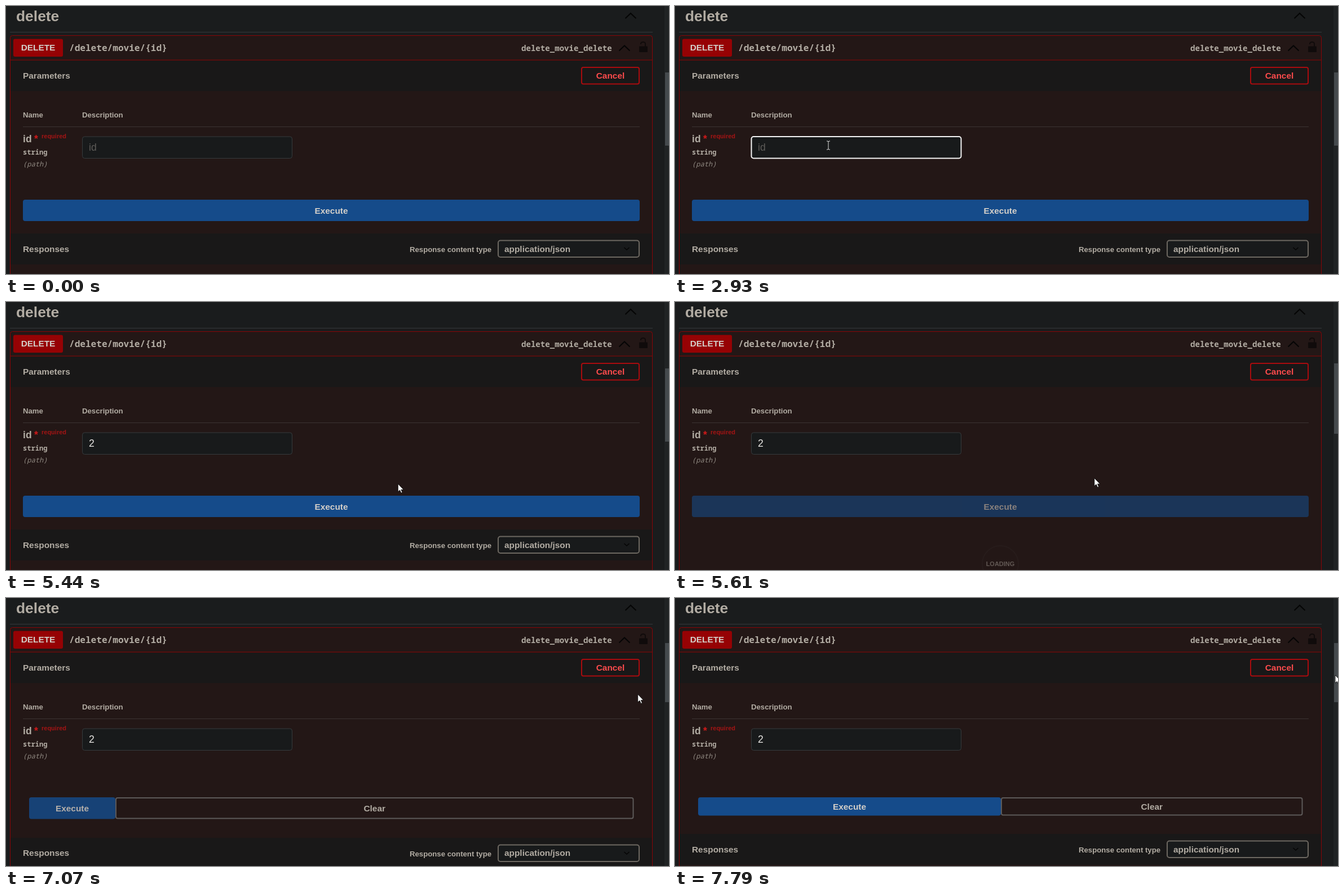
Animation of 1176 by 476 pixels, one loop 8 s. Source, as an HTML page:

```html
<!DOCTYPE html>
<html lang="en">
<head>
<meta charset="utf-8">
<style>
  html, body { margin: 0; width: 100%; height: 100%; overflow: hidden; background: #1a1c1d; }
  svg { display: block; width: 1176px; height: 476px; }
  text { font: bold 15.4px "Liberation Sans", Arial, sans-serif; fill: #b2aca3; }
  .small { font-size: 13.2px; }
  .mono { font-family: "Noto Sans Mono", monospace; font-weight: 600; }
  .middle { text-anchor: middle; }
  .value { font-size: 17.6px; font-weight: 400; }
  .button { fill: #d3cfc9; }
  .red { fill: #231716; }
  .bar { fill: #191818; }
  .chevron { fill: none; stroke: #050505; stroke-width: 2; }
  .field { fill: #181a1b; }
</style>
</head>
<body>
<svg viewBox="0 0 1176 476">
  <rect width="1176" height="476" fill="#1a1c1d"/>
  <text x="18" y="27" style="font-size:26.4px">delete</text>
  <path class="chevron" d="M1098.5 22l9.5-9 9.5 9"/>
  <path d="M7 46.5H1147" stroke="#35393b"/>

  <rect class="red" x="7.5" y="52.5" width="1139" height="440" rx="4"/>
  <rect class="bar" x="8" y="97" width="1138" height="54"/>
  <g id="responses">
    <rect class="bar" x="8" y="404" width="1138" height="55"/>
    <text x="30" y="436.5">Responses</text>
    <text class="small" x="716" y="437">Response content type</text>
    <rect class="field" x="873" y="416.5" width="250" height="29.5" rx="4" stroke="#6d6861" stroke-width="2"/>
    <text x="884" y="436.5">application/json</text>
    <path class="chevron" d="M1096.500 429l4.500 4 4.500-4" style="stroke-width:1.500"/>
  </g>
  <rect x="7.5" y="52.5" width="1139" height="440" rx="4" fill="none" stroke="#8a0406"/>
  <path d="M8 96H1146" stroke="#8a0406"/>

  <rect x="13" y="58.500" width="88" height="31.500" rx="3" fill="#960204"/>
  <text class="button middle" x="57" y="79">DELETE</text>
  <text class="mono" x="112" y="80" style="font-size:16.1px">/delete/movie/{id}</text>
  <text class="mono" x="914" y="80" style="font-size:14.1px">delete_movie_delete</text>
  <path class="chevron" d="M1087.500 79.500l9.500-9 9.500 9"/>
  <g fill="#100b0b">
    <rect x="1123" y="71.500" width="15" height="10.500" rx="1"/>
    <path d="M1126 68v-1a4 3 0 0 1 8 0v5" fill="none" stroke="#100b0b" stroke-width="2"/>
  </g>

  <text x="30" y="129">Parameters</text>
  <rect x="1021" y="109" width="102" height="29.500" rx="3" fill="none" stroke="#a90b0e" stroke-width="2"/>
  <text class="middle" x="1072" y="129" style="fill:#fb4b4c">Cancel</text>

  <text class="small" x="30" y="198">Name</text>
  <text class="small" x="135" y="198">Description</text>
  <path d="M30 214.500H1124" stroke="#3b3432"/>
  <text x="30" y="242" style="font-size:17.6px">id</text>
  <text x="50" y="242" style="font-size:17.6px;fill:#d01a1a">*</text>
  <text x="63" y="235" style="font-size:11px;fill:#a31414">required</text>
  <text class="mono" x="30" y="264" style="font-size:12.1px">string</text>
  <text class="mono" x="30" y="285" style="font-size:12.1px;font-style:italic;font-weight:400;fill:#8f8880">(path)</text>
  <rect id="input" class="field" x="135.500" y="232" width="372" height="38.500" rx="4"/>
  <text id="value" class="value" x="147" y="257"></text>
  <rect id="caret" y="242" width="1" height="19" fill="#e8e6e3"/>

  <g id="execute">
    <rect fill="#154b8a" rx="4"/>
    <text class="button middle">Execute</text>
  </g>
  <g id="clear">
    <rect fill="none" stroke="#5d5a59" stroke-width="2" rx="3"/>
    <text class="middle">Clear</text>
  </g>
  <g id="loading">
    <circle cx="577" cy="465" r="32" fill="none" stroke="#555" stroke-opacity=".2" stroke-width="2"/>
    <path id="arc" d="M554.400 442.400A32 32 0 0 1 599.600 442.400" fill="none" stroke="#736d6b" stroke-width="2"/>
    <text class="middle" x="577" y="468.500" style="font-size:11px">LOADING</text>
  </g>

  <rect x="1168" width="8" height="476" fill="#202324"/>
  <rect id="thumb" x="1169" width="7" fill="#454a4d"/>

  <g id="cursor">
    <path id="arrow" d="M0 0V14L3.300 11.200 5.600 16.400 7.800 15.400 5.600 10.400H10Z" fill="#fff" stroke="#000" stroke-width=".8"/>
    <path id="beam" d="M-3-7H-1L0-6 1-7H3M0-6V7M-3 8H-1L0 7 1 8H3" fill="none" stroke="#ddd"/>
    <path id="hand" d="M-1 0Q1-1.500 2 0V5L7 6Q9 6.500 9 9V13L7 17H0L-4 11Q-4 8-1 10Z" fill="#fff" stroke="#000" stroke-width=".8"/>
  </g>
</svg>
<script>
const LOOP = 8000, FOCUS = 2400, TYPED = 3500, BLUR = 4550, REQUEST = 5500, RESPONSE = 7070;

// time, x, y of the pointer's hot spot
const pointerPath = [
  [700, 1029, 430], [910, 768, 298], [1300, 768, 299], [1520, 768, 299],
  [2120, 266, 240], [2260, 272, 247], [3830, 272, 247], [4230, 601, 366],
  [4980, 601, 366], [5440, 695, 323], [5790, 795, 302], [6420, 818, 296],
  [6650, 1090, 185], [6900, 1119, 171], [7100, 1121, 171], [7790, 1171, 137]
];

const $ = id => document.getElementById(id);
const show = (id, visible) => $(id).style.display = visible ? "" : "none";
const set = (el, attrs) => Object.entries(attrs).forEach(([k, v]) => el.setAttribute(k, v));
const mix = (a, b, p) => a + (b - a) * p;
const ease = (t, start, length = 300) =>
  1 - (1 - Math.min(1, Math.max(0, (t - start) / length))) ** 2.3;

function pointerAt(t) {
  const next = pointerPath.findIndex(key => key[0] > t);
  if (next < 0) return pointerPath.at(-1).slice(1);
  if (next === 0) return pointerPath[0].slice(1);
  const [t0, x0, y0] = pointerPath[next - 1], [t1, x1, y1] = pointerPath[next];
  const p = (t - t0) / (t1 - t0);
  return [mix(x0, x1, p), mix(y0, y1, p)];
}

function placeButton(id, x, y, width, height, inset = 0) {
  const [box, label] = $(id).children;
  set(box, { x: x + inset, y: y + inset, width: width - 2 * inset, height: height - 2 * inset });
  set(label, { x: x + width / 2, y: y + height / 2 + 5.5 });
}

function drawInput(t) {
  const focused = t >= FOCUS && t < BLUR, typed = t >= TYPED;
  set($("input"), { stroke: focused ? "#f4f4f4" : "#363b3d", "stroke-width": focused ? 2 : 1 });
  $("value").textContent = typed ? "2" : "id";
  $("value").style.fill = typed ? "#e8e6e3" : "#5d5b58";
  const sinceBlink = t - (typed ? TYPED : FOCUS);
  show("caret", focused && sinceBlink % 1060 < 530);
  set($("caret"), { x: typed ? 157 : 147 });
}

function drawButtons(t) {
  const done = t >= RESPONSE, busy = t >= REQUEST && !done;
  const p = ease(t, RESPONSE);
  show("clear", done);
  show("loading", busy);
  show("responses", !busy);
  set($("execute"), { opacity: done ? mix(.83, 1, p) : mix(1, .35, ease(t, REQUEST)) });
  set($("responses"), { transform: `translate(0 ${done ? mix(22, 15, p) : 0})` });
  if (done) {
    const width = mix(150, 537, p), height = mix(38.5, 32.5, p);
    placeButton("execute", 41, 354, width, height);
    placeButton("clear", 41 + width, 354, 1072.5 - width, height, 1);
  } else {
    placeButton("execute", 30, 344, 1094, 38);
  }
  set($("loading"), { opacity: ease(t, REQUEST, 500) });
  set($("arc"), { transform: `rotate(${12 + .235 * (t - 6420)} 577 465)` });
  const [y, height] = done ? [80, 105] : busy ? [109, 125] : [118, 130];
  set($("thumb"), { y, height });
}

function drawPointer(t) {
  const [x, y] = pointerAt(t);
  const within = (left, top, right, bottom) => x > left && x < right && y > top && y < bottom;
  const beam = within(135, 231, 508, 271), hand = t < REQUEST && within(30, 344, 1124, 382);
  show("cursor", t >= 700);
  show("beam", beam);
  show("hand", hand);
  show("arrow", !beam && !hand);
  set($("cursor"), { transform: `translate(${x} ${y})` });
}

function frame() {
  const t = performance.now() % LOOP;
  drawInput(t);
  drawButtons(t);
  drawPointer(t);
  requestAnimationFrame(frame);
}
frame();
</script>
</body>
</html>
```
